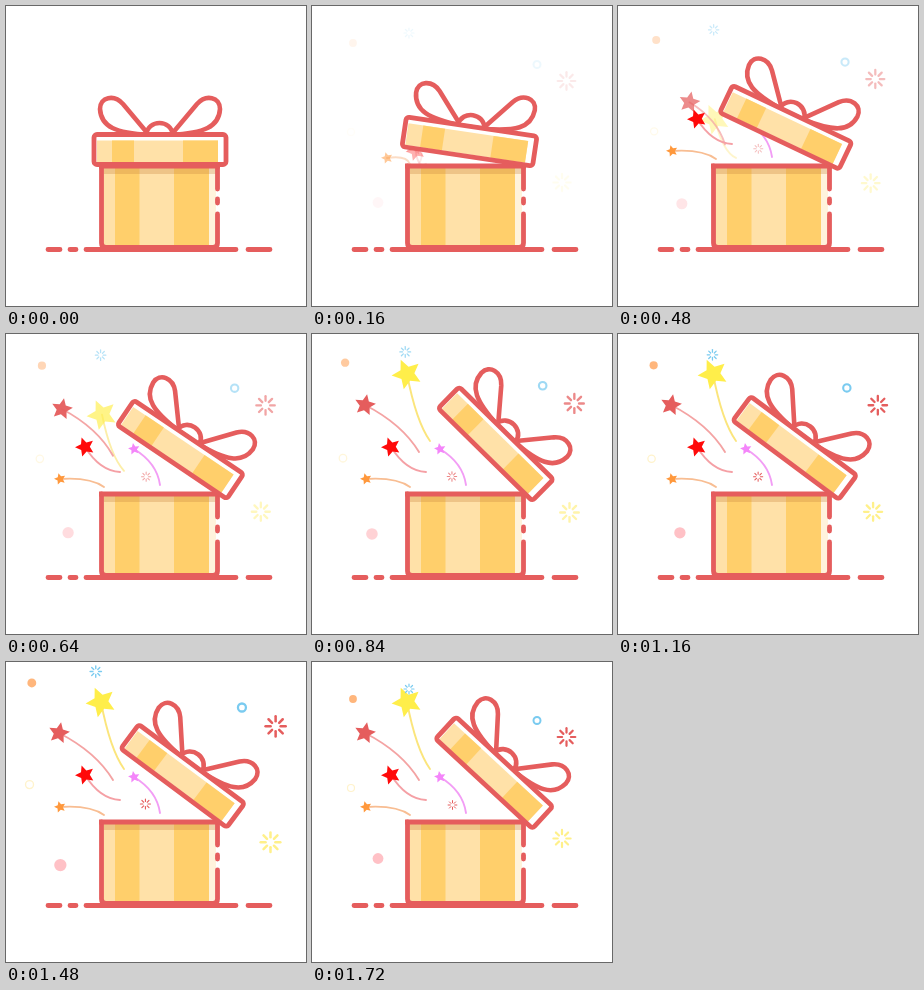
Animation of 300 by 300 pixels, one loop 1.88 s. Source, as an HTML page with a canvas:

```html
<!DOCTYPE html>
<html>
<head>
<meta charset="utf-8">
<title>Gift box</title>
<style>
html, body { margin: 0; width: 100%; height: 100%; overflow: hidden; background: #fff; }
canvas { display: block; }
</style>
</head>
<body>
<canvas id="stage" width="300" height="300"></canvas>
<script>
const ctx = document.getElementById('stage').getContext('2d');
const LOOP = 1880, STEP = 40, LAST = 1720, MOUTH_Y = 160;
const RED = '#e55d5d', LIGHT = '#ffe1a8', GOLD = '#ffcf6b', BLUE = '#7acbf0';

const clamp = v => Math.max(0, Math.min(1, v));
const mix = (a, b, k) => a + (b - a) * k;
const progress = (t, start, end) => clamp((t - start) / (end - start));
// Linear rise to 1 at the peak, then linear fall
const pulse = (t, start, peak, end) => Math.min(progress(t, start, peak), 1 - progress(t, peak, end));

// The lid swings open steadily, then dips and recovers around 1320 ms
const lidAngle = t => Math.min(.053 * t, 32.6 + .0255 * Math.abs(t - 1320)) * Math.PI / 180;
const confettiScale = t => 1 + .1 * pulse(t, 280, 1040, 1280) + .142 * pulse(t, 1280, 1480, 1680);

function stroke(path, color, width, cap = 'round') {
  ctx.strokeStyle = color;
  ctx.lineWidth = width;
  ctx.lineCap = cap;
  ctx.stroke(new Path2D(path));
}

function fillRect(color, x, y, w, h) {
  ctx.fillStyle = color;
  ctx.fillRect(x, y, w, h);
}

function circle(x, y, r, color, width) {
  ctx.beginPath();
  ctx.arc(x, y, r, 0, 2 * Math.PI);
  ctx.fillStyle = ctx.strokeStyle = color;
  ctx.lineWidth = width || 1;
  if (width) ctx.stroke(); else ctx.fill();
}

function burst(x, y, r, color, width) {
  for (let i = 0; i < 8; i++) {
    const c = r * Math.cos(i * Math.PI / 4), s = r * Math.sin(i * Math.PI / 4);
    stroke(`M${x + c / 2},${y + s / 2}L${x + c},${y + s}`, color, width);
  }
}

function star(x, y, r, tilt, color) {
  ctx.beginPath();
  for (let i = 0; i < 10; i++) {
    const d = i % 2 ? r * .48 : r, a = i * Math.PI / 5 + tilt * Math.PI / 180;
    ctx.lineTo(x + d * Math.sin(a), y - d * Math.cos(a));
  }
  ctx.fillStyle = color;
  ctx.fill();
}

// A star flies from the box mouth to its place; bend and tail shape the trail behind it
const stars = [
  { x: 95, y: 40, r: 15.5, tilt: -24, color: '#ffee4a', line: '#fbe57c', fromX: 98, bend: [104, 87], tail: [118, 107], start: 250, end: 840 },
  { x: 53, y: 71, r: 11, tilt: 11, color: RED, line: '#f4a3a3', fromX: 118, bend: [90, 90], tail: [107, 118], start: 0, end: 670 },
  { x: 79, y: 113, r: 10, tilt: -20, color: '#ff0a0a', line: '#f5a0a5', fromX: 115, bend: [94, 137], tail: [114, 138], start: 40, end: 420 },
  { x: 54, y: 145, r: 6, tilt: -15, color: '#ff983c', line: '#f8bd92', fromX: 99, bend: [84, 143], tail: [98, 153], start: 0, end: 300 },
  { x: 128, y: 115, r: 6, tilt: -10, color: '#f485fa', line: '#f29df5', fromX: 154, bend: [151, 129], tail: [154, 151], start: 200, end: 480 }
];

function drawStar({ x, y, r, tilt, color, line, fromX, bend, tail, start, end }, t) {
  const k = progress(t, start, end);
  const dx = (fromX - x) * (1 - k), dy = (MOUTH_Y - y) * (1 - k);
  const tailY = mix(MOUTH_Y, tail[1], k * k), lag = tailY - tail[1];
  const headX = x + dx, headY = y + dy;
  ctx.globalAlpha = k;
  stroke(`M${headX},${headY} Q${bend[0] + dx / 2},${bend[1] + (dy + lag) / 2} ${tail[0]},${tailY}`, line, 1.9);
  star(headX, headY, r, tilt, color);
  ctx.globalAlpha = 1;
}

function drawConfetti(t) {
  const scale = confettiScale(t);
  ctx.save();
  ctx.globalAlpha = progress(t, 0, 1150);
  ctx.translate(148, 150);
  ctx.scale(scale, scale);
  ctx.translate(-148, -150);
  circle(41, 37, 3.9, '#ffb67c');
  circle(66, 196.5, 5.4, '#ffc1c6');
  circle(225, 58.5, 3.5, BLUE, 2);
  circle(39, 126, 3.5, '#fff3cc', 1.2);
  burst(97, 27, 5, BLUE, 1.2);
  burst(254.5, 75, 8.8, RED, 2.2);
  burst(250, 176.5, 8.6, '#fff08a', 2.2);
  burst(140.5, 143, 4.4, RED, 1);
  ctx.restore();
}

function drawBox() {
  fillRect(LIGHT, 97, 160, 106, 81);
  fillRect('#fff3dc', 203, 160, 7, 81);
  fillRect(GOLD, 109, 160, 24.5, 81);
  fillRect(GOLD, 168, 160, 35, 81);
  fillRect('rgba(200,130,60,.3)', 98, 162, 112, 6);
  stroke('M95.5,160 V237 Q95.5,241.5 100,241.5 H207 Q211.5,241.5 211.5,237 V208 M211.5,193 V197 M211.5,160 V183', RED, 4.8);
  stroke('M93,160 H214', RED, 5, 'butt');
  stroke('M42,243.5 H54 M64,243.5 H70 M80,243.5 H230 M242,243.5 H264', RED, 4.8);
}

function drawBow() {
  const half = 'M143,129 L117,98 C108,88 94,91 94,103 C95,121 110,127 143,129Z';
  for (const side of [1, -1]) {
    ctx.save();
    ctx.translate(154, 0);
    ctx.scale(side, 1);
    ctx.translate(-154, 0);
    ctx.fillStyle = '#fff';
    ctx.fill(new Path2D(half));
    stroke(half, RED, 4.6);
    ctx.restore();
  }
  const knot = 'M140,129 C142,113 165,113 167,129Z';
  ctx.fillStyle = '#fff';
  ctx.fill(new Path2D(knot));
  stroke(knot, RED, 4.6);
}

function drawLid(t) {
  ctx.save();
  ctx.translate(210, 163);
  ctx.rotate(lidAngle(t));
  ctx.translate(-210, -163);
  drawBow();
  fillRect('#fff', 88, 129, 132, 29.5);
  fillRect(LIGHT, 91, 134.5, 121, 22);
  fillRect(GOLD, 106, 134.5, 22, 22);
  fillRect(GOLD, 177, 134.5, 35, 22);
  ctx.beginPath();
  ctx.roundRect(88, 128.5, 132, 30, 3);
  ctx.strokeStyle = RED;
  ctx.lineWidth = 4.8;
  ctx.stroke();
  ctx.restore();
}

function draw(now) {
  const t = Math.min(Math.floor(now % LOOP / STEP) * STEP, LAST);
  ctx.lineJoin = 'round';
  fillRect('#fff', 0, 0, 300, 300);
  stars.forEach(s => drawStar(s, t));
  drawConfetti(t);
  drawBox();
  drawLid(t);
}

let start;
function tick(now) {
  start ??= now;
  draw(now - start);
  requestAnimationFrame(tick);
}
draw(0);
requestAnimationFrame(tick);
</script>
</body>
</html>
```
